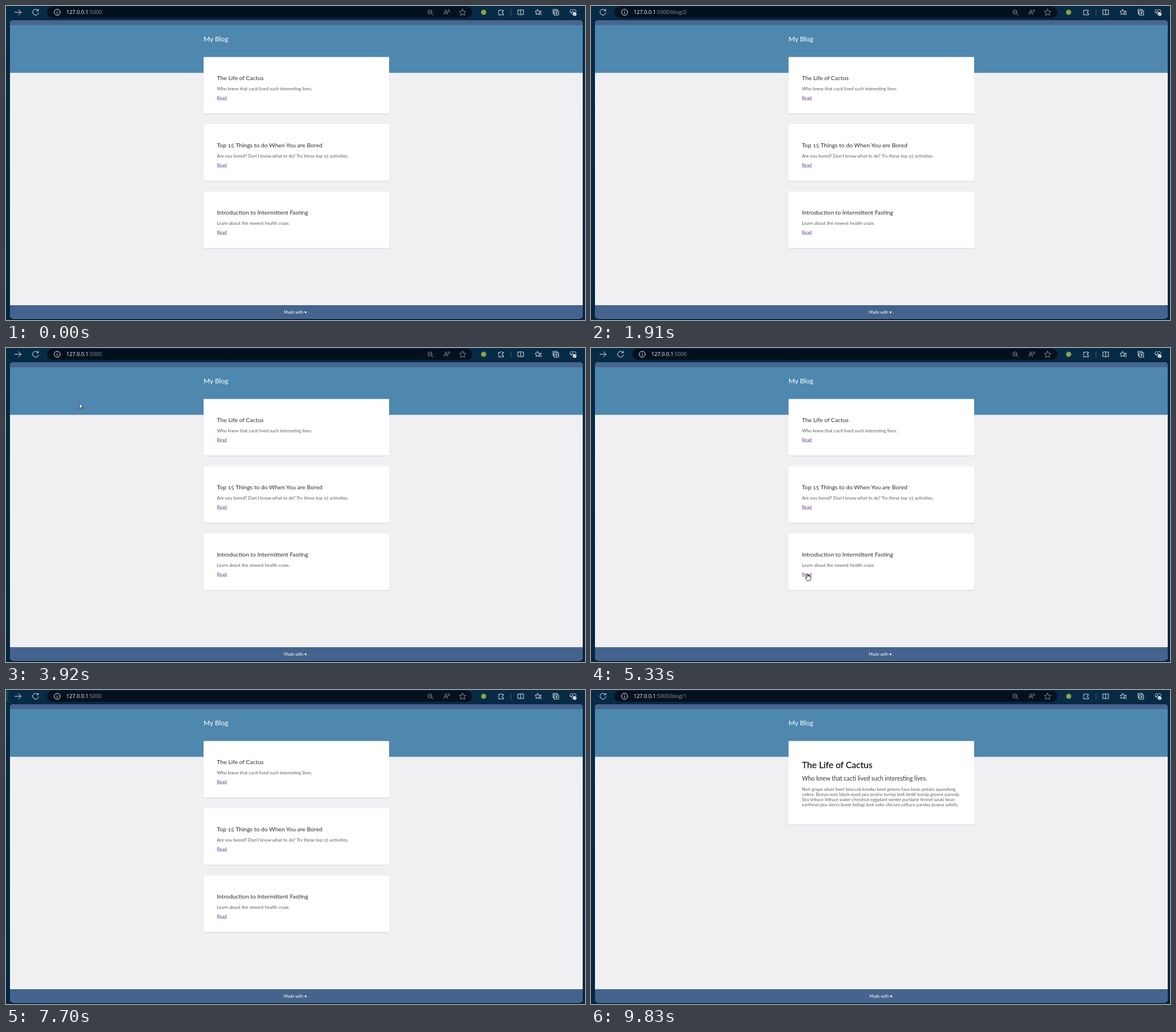
These frames come from a looping animation (1017x551 px, 9880 ms). An HTML page:

```html
<!DOCTYPE html>
<html lang="en">
<head>
<meta charset="utf-8">
<title>My Blog</title>
<style>
  html, body { margin: 0; width: 100%; height: 100%; overflow: hidden; background: #06294500; }
  svg { display: block; width: 1017px; height: 551px; }
  .page text { font-family: Lato, "Open Sans", sans-serif; font-variant-numeric: oldstyle-nums; }
  .brand { font-size: 12px; fill: #fff; }
  .title { font-size: 10.35px; fill: #2c2c2c; }
  .head { font-size: 15.6px; fill: #161616; stroke: #161616; stroke-width: .25; }
  .sub { font-size: 10.45px; fill: #333; }
  .body { font-size: 7.95px; fill: #5c5c5c; }
  .link { font-size: 7.95px; fill: #68458c; }
  .foot { font-size: 7.3px; fill: #fff; text-anchor: middle; }
  .url { font: 9.2px "Open Sans", "Noto Sans", sans-serif; fill: #fff; }
  .url .dim { fill: #8d98a3; }
  .icon { fill: none; stroke: #e4e9ee; stroke-width: 1; stroke-linecap: round; stroke-linejoin: round; }
  .faint { stroke: #87929d; }
</style>
</head>
<body>
<svg id="stage" viewBox="0 0 1017 551"></svg>
<script>
const LOOP = 9880;
const stage = document.getElementById('stage');

function add(parent, tag, attrs = {}, text) {
  const el = document.createElementNS('http://www.w3.org/2000/svg', tag);
  for (const k in attrs) el.setAttribute(k, attrs[k]);
  if (text !== undefined) el.textContent = text;
  parent.append(el);
  return el;
}
const group = (parent, cls = '') => add(parent, 'g', { class: cls });
const rect = (p, x, y, width, height, fill, rx = 0) =>
  add(p, 'rect', { x, y, width, height, fill, rx });
const label = (p, cls, x, y, s) => add(p, 'text', { class: cls, x, y }, s);
const icon = (p, x, y, d, cls = '') =>
  add(p, 'path', { class: 'icon ' + cls, d, transform: `translate(${x} ${y})` });
const show = (el, on) => el.setAttribute('display', on ? 'inline' : 'none');
const move = (el, x, y = 0) => el.setAttribute('transform', `translate(${x} ${y})`);

function star(r, cx = 0, cy = 0) {
  const pts = [];
  for (let i = 0; i < 10; i++) {
    const a = i * Math.PI / 5 - Math.PI / 2, q = i % 2 ? r * .5 : r;
    pts.push((cx + q * Math.cos(a)).toFixed(2) + ' ' + (cy + q * Math.sin(a)).toFixed(2));
  }
  return 'M' + pts.join('L') + 'Z';
}

// Browser frame
const defs = add(stage, 'defs');
const grad = add(defs, 'linearGradient', { id: 'navy', x1: 0, y1: 0, x2: 0, y2: 1 });
add(grad, 'stop', { offset: 0, 'stop-color': '#072a45' });
add(grad, 'stop', { offset: 1, 'stop-color': '#052642' });
rect(stage, 0, 0, 1017, 551, 'url(#navy)');

const backHover = rect(stage, -26, 1, 30, 20, '#1c3e57', 3);
const reloadHover = rect(stage, 6, 1, 30, 20, '#15364f', 3);
const pill = rect(stage, 41, 1, 778, 20, '#03111f', 10);
const forward = icon(stage, 21, 11, 'M-5.5 0H5.5M.8-4.7L5.5 0L.8 4.7');

const bar = group(stage);
const reload = icon(bar, 21, 11, 'M4.4-3A5.2 5.2 0 1 0 5.2 .8M4.9-5.4V-2.6H2');
const cross = icon(bar, 21, 11, 'M-4-4L4 4M4-4L-4 4');
icon(bar, 59, 11, 'M5.3 0A5.3 5.3 0 1 1-5.3 0A5.3 5.3 0 1 1 5.3 0M0-.4V2.7M0-2.6V-2.5');
const url = add(bar, 'text', { class: 'url', x: 75, y: 14.4 });
add(url, 'tspan', {}, '127.0.0.1');
const path = add(url, 'tspan', { class: 'dim' });

icon(stage, 745, 10.5, 'M3.2 0A3.6 3.6 0 1 1-4 0A3.6 3.6 0 1 1 3.2 0M2.3 2.5L5.6 5.4M-2 0H1.2', 'faint');
icon(stage, 774, 11, 'M-4.8 4L-1.4-4.5L2 4M-3.6 1H.8M2-4Q3.4-2.8 2.8-1M3.8-5Q5.8-3 4.7-.2', 'faint');
icon(stage, 802, 11.5, star(6), 'faint');
add(stage, 'circle', { cx: 839, cy: 11, r: 4.6, fill: '#8aa34a' });
icon(stage, 870, 11, 'M-4.4-3.4H-1.5A1.7 1.7 0 0 1 1.7-3.4H3.6V-1.5H2.8A1.6 1.6 0 0 0 2.8 1.7H3.6V4.8H1.3A1.5 1.5 0 0 0-1.6 4.8H-4.4V1.8A1.7 1.7 0 0 1-4.4-1.2Z');
rect(stage, 886.5, 6, 1, 11, '#4b6071');
icon(stage, 904, 11, 'M0-5V5M-1.4-4H-5V4H-1.4M1.4-4H5V4H1.4');
icon(stage, 935, 11, star(5, -1.2, 0) + 'M3-1.6H5.6M2.6 1.2H5.6M3.2 4H5.6');
icon(stage, 965.5, 11, 'M-2.4-2.4H5.2V5H-2.4ZM-2.4 2.4H-4.6V-5H2.8V-2.4M1.4-.6V3.2M-.5 1.3H3.3');
icon(stage, 996, 11, 'M-3 1.6L0 4.6M-5-.6C-6.5-4-2-6.4 0-3.2C2-6.4 6.5-4 5-.6M-5 .4H-2L-.8-1.8L1 1.6L2 0H3');
add(stage, 'circle', { cx: 999, cy: 14.3, r: 3, fill: '#fff' });
add(stage, 'path', { d: 'M997.6 14.3L998.7 15.4L1000.5 13.3', fill: 'none', stroke: '#072a45', 'stroke-width': .9 });

// Web page
const clip = add(defs, 'clipPath', { id: 'win' });
rect(clip, 7, 25, 1006, 523.5, '#000', 6);
const page = group(stage, 'page');
page.setAttribute('clip-path', 'url(#win)');
rect(page, 7, 25, 1006, 524, '#f0f0f2');
rect(page, 7, 25, 1006, 9, '#46658f');
rect(page, 7, 33.7, 1006, 83.6, '#4f88af');
rect(page, 7, 525, 1006, 24, '#44638d');
label(page, 'brand', 347, 62, 'My Blog');

function card(p, y, h) {
  rect(p, 346.5, y + .6, 327, h + .9, 'rgba(0,0,0,.05)', 1.5);
  rect(p, 347, y + .3, 326, h + .5, 'rgba(0,0,0,.07)', 1);
  rect(p, 347, y, 326, h, '#fff', 1);
}

const posts = [
  {
    title: 'The Life of Cactus', height: 146.5,
    sub: ['Who knew that cacti lived such interesting lives.'],
    body: [
      'Nori grape silver beet broccoli kombu beet greens fava bean potato quandong',
      'celery. Bunya nuts black-eyed pea prairie turnip leek lentil turnip greens parsnip.',
      'Sea lettuce lettuce water chestnut eggplant winter purslane fennel azuki bean',
      'earthnut pea sierra leone bologi leek soko chicory celtuce parsley jicama salsify.'
    ]
  },
  {
    title: 'Top 15 Things to do When You are Bored', height: 166.5,
    sub: ["Are you bored? Don't know what to do? Try these top 15", 'activities.'],
    body: [
      'Chase ball of string eat plants, meow, and throw up because I ate plants going to',
      'catch the red dot today going to catch the red dot today. I could pee on this if I',
      'had the energy. Chew Quob power cord steal the warm chair right after you get up',
      'for purr for no reason leave hair everywhere, decide to want nothing to do with',
      'my owner today.'
    ]
  },
  {
    title: 'Introduction to Intermittent Fasting', height: 155.5,
    sub: ['Learn about the newest health craze.'],
    body: [
      'Cupcake ipsum dolor. Sit amet marshmallow topping cheesecake muffin. Halvah',
      'croissant candy canes bonbon candy. Apple pie jelly beans topping carrot cake',
      'danish tart cake cheesecake. Muffin danish chocolate soufflé pastry icing bonbon',
      'oat cake. Powder cake jujubes oat cake. Lemon drops truffle roll marshmallow',
      'halvah carrot cake.'
    ]
  }
];

const home = group(page);
posts.forEach((post, i) => {
  const y = 89.5 + 118 * i;
  card(home, y, 99.3);
  label(home, 'title', 370.5, y + 40.2, post.title);
  label(home, 'body', 370.5, y + 58, post.sub.join(' '));
  label(home, 'link', 370.5, y + 74.2, 'Read');
  rect(home, 370.5, y + 75.1, 17.8, .6, '#68458c');
});
label(home, 'foot', 510, 540, 'Made with ♥ .');

const articles = posts.map(post => {
  const g = group(page);
  card(g, 89.5, post.height);
  label(g, 'head', 370.5, 137.2, post.title);
  post.sub.forEach((s, i) => label(g, 'sub', 370.5, 158.7 + 11.2 * i, s));
  const top = 176.7 + 11.1 * (post.sub.length - 1);
  post.body.forEach((s, i) => label(g, 'body', 370.5, top + 9 * i, s));
  label(g, 'foot', 510, 540, 'Made with ♥.');
  return g;
});

// Pointer
const pointer = group(stage);
const arrow = add(pointer, 'path', {
  d: 'M0 0V9.2L2.1 7.3L3.5 10.4L5 9.7L3.6 6.7H6.3Z',
  fill: '#fff', stroke: '#111', 'stroke-width': .8, 'stroke-linejoin': 'round'
});
const hand = add(pointer, 'path', {
  d: 'M-1 .8Q0-.8 1 .8V4.6Q2-.0 2.9 4.8Q4-.0 4.7 5.2Q6.2 4.4 6.2 6.4V9Q6 11 4.8 12.4H-.4Q-1.6 10.2-3.2 8Q-3.8 6.2-2.4 6.4L-1 8Z',
  fill: '#fff', stroke: '#111', 'stroke-width': .85, 'stroke-linejoin': 'round'
});

// Each trip lists time, x, y
const trips = [
  [[70, 903, 545], [330, 655, 463], [520, 555, 443], [740, 435, 316], [850, 408, 311],
   [990, 383, 283], [1130, 379, 278], [1840, 379, 278]],
  [[1980, 228, 135], [2060, 200, 127], [2130, 168, 118], [2400, 18, 186], [2750, 2, 30],
   [2970, 1, 11], [3120, -2, 11], [3200, -12, 11]],
  [[3700, -8, 12], [4100, 240, 166], [4200, 255, 176], [4300, 295, 196], [4500, 350, 346],
   [4700, 372, 390], [5000, 380, 396], [6560, 380, 396], [6630, 340, 284], [6690, 240, 165],
   [6760, 168, 118], [6820, 124, 73], [7000, 60, 30], [7220, -10, 11]],
  [[7900, -8, 12], [8150, 120, 90], [8510, 376, 160], [8580, 379, 161], [9360, 379, 161],
   [9440, 540, 245], [9560, 841, 379], [9620, 920, 450], [9700, 995, 510], [9780, 1018, 552]]
];

function pointerAt(t) {
  const trip = trips.find(k => t >= k[0][0] && t < k[k.length - 1][0]);
  if (!trip) return null;
  const i = trip.findIndex(k => k[0] > t);
  const [t0, x0, y0] = trip[i - 1], [t1, x1, y1] = trip[i];
  const f = (t - t0) / (t1 - t0);
  return { x: x0 + (x1 - x0) * f, y: y0 + (y1 - y0) * f };
}

const within = (t, ...spans) => spans.some(([a, b]) => t >= a && t < b);

function render(t) {
  const open = within(t, [1980, 3580]) ? 2 : within(t, [6630, 7560]) ? 3 : t >= 9360 ? 1 : 0;
  const address = within(t, [1840, 1980]) ? 2 : within(t, [9300, 9360]) ? 1 : open;
  const busy = within(t, [1450, 1840], [6300, 7000], [9050, 9300]);
  const dx = address ? 0 : 31;

  show(home, !open);
  articles.forEach((g, i) => show(g, open === i + 1));
  show(forward, !address);
  show(reload, !busy);
  show(cross, busy);
  show(backHover, within(t, [3370, 3800], [7420, 7950]));
  show(reloadHover, within(t, [2850, 3120]));
  move(bar, dx);
  pill.setAttribute('x', 41 + dx);
  pill.setAttribute('width', 778 - dx);
  path.textContent = ':5000' + (address ? '/blog/' + address : '');

  const p = pointerAt(t);
  show(pointer, p);
  if (!p) return;
  const overLink = !open && p.x > 370 && p.x < 389 &&
    posts.some((_, i) => Math.abs(p.y - 161 - 118 * i) < 6);
  show(hand, overLink);
  show(arrow, !overLink);
  move(pointer, p.x, p.y);
}

function tick() {
  render(performance.now() % LOOP);
  requestAnimationFrame(tick);
}
tick();
</script>
</body>
</html>
```
